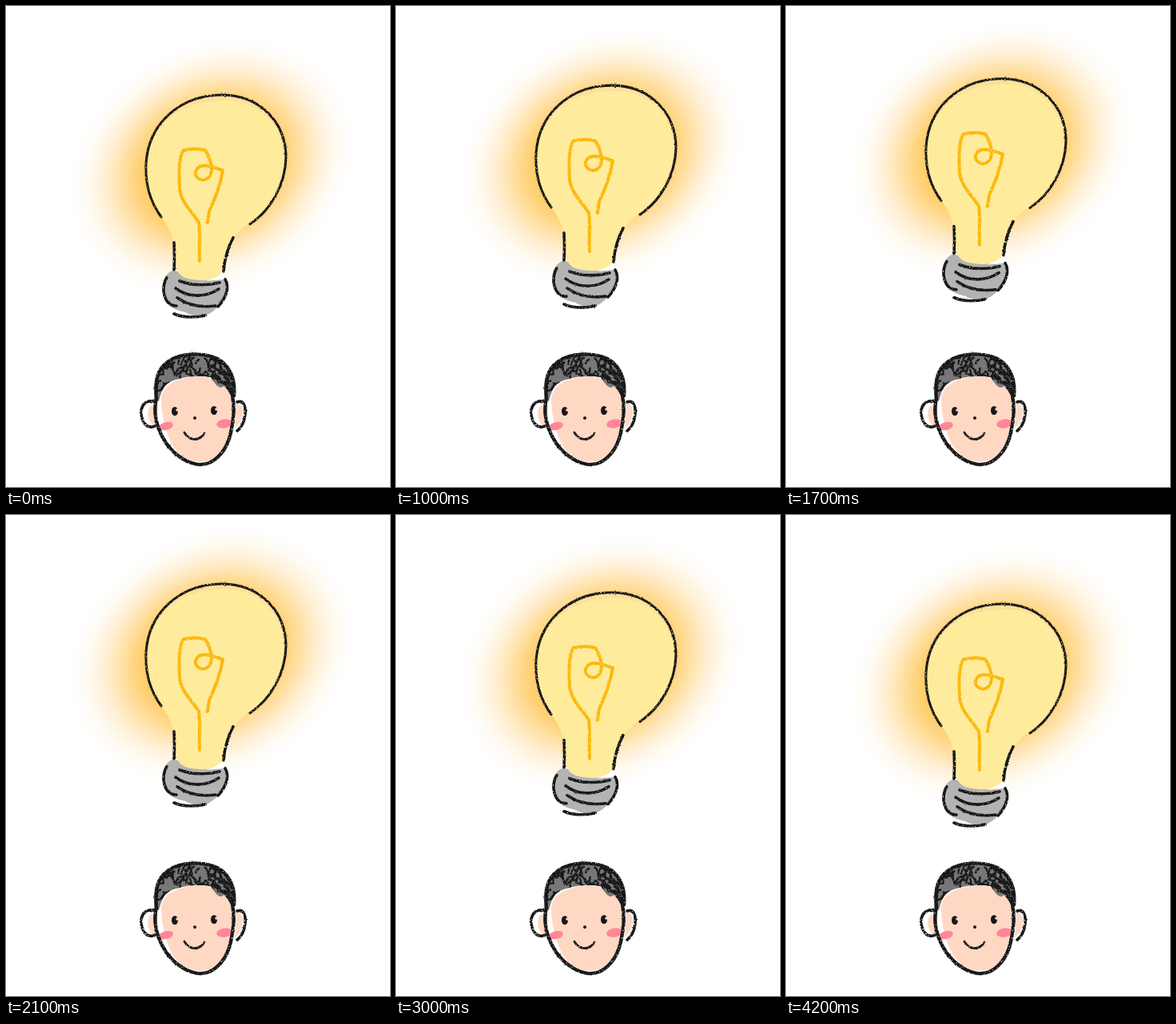
Animation of 480 by 600 pixels, one loop 4300 ms. Source, as an HTML page:

```html
<!DOCTYPE html>
<html lang="en">
<head>
<meta charset="utf-8">
<title>Bright idea</title>
<style>
  html, body { margin: 0; width: 100%; height: 100%; overflow: hidden; background: #fff; }
  svg { display: block; }
  .ink { fill: none; stroke: #171717; stroke-width: 3.6; stroke-linecap: round; stroke-linejoin: round; filter: url(#crayon); }
  .skin { fill: #ffd8c4; }
</style>
</head>
<body>
<svg width="480" height="600" viewBox="0 0 480 600">
  <defs>
    <radialGradient id="halo">
      <stop offset=".45" stop-color="#ffca60"/>
      <stop offset=".55" stop-color="#ffd582"/>
      <stop offset=".66" stop-color="#ffe4b0"/>
      <stop offset=".77" stop-color="#fff1d9"/>
      <stop offset=".89" stop-color="#fffbf4"/>
      <stop offset="1" stop-color="#fff"/>
    </radialGradient>
    <filter id="crayon" filterUnits="userSpaceOnUse" x="150" y="90" width="220" height="500" color-interpolation-filters="sRGB">
      <feTurbulence type="fractalNoise" baseFrequency=".3" numOctaves="2" seed="4" result="wobble"/>
      <feDisplacementMap in="SourceGraphic" in2="wobble" scale="2" xChannelSelector="R" yChannelSelector="G" result="rough"/>
      <feTurbulence type="fractalNoise" baseFrequency=".55" numOctaves="2" seed="9"/>
      <feColorMatrix values="0 0 0 0 0  0 0 0 0 0  0 0 0 0 0  5 0 0 0 -.95" result="grain"/>
      <feComposite in="rough" in2="grain" operator="in"/>
    </filter>
    <path id="hairShape" d="M187 492C185 470 187 455 201 444C217 432 247 431 264 440C280 448 288 467 284 491C280 485 278 478 272 474C266 480 261 470 256 463C238 460 218 463 205 469C196 474 194 482 191 493Z"/>
    <clipPath id="hairClip"><use href="#hairShape"/></clipPath>
  </defs>

  <g id="bulb">
    <ellipse rx="185" ry="150" transform="translate(257 200) rotate(-30)" fill="url(#halo)"/>
    <path fill="#fde09a" d="M194 262C181 244 174 221 175 197C178 146 218 111 270 111C318 111 351 146 350 190C349 226 329 257 305 272L250 200Z"/>
    <path fill="#b3b3b3" d="M208 330C197 335 193 347 197 362C200 374 210 379 224 382Q236 389 250 386C264 380 274 367 277 348L274 340Z"/>
    <path fill="#ffeb9c" d="M268 118C316 115 346 149 347 188C348 223 328 253 304 271C288 281 279 294 275 311L272 329C267 341 255 343 241 342C227 341 217 339 213 327C212 306 211 288 199 270C184 249 175 228 175 205C176 151 215 120 268 118Z"/>
    <path fill="#fff" d="M272 331L274 341L250 343Q265 339 272 331Z"/>
    <g class="ink">
      <path stroke-width="3.1" d="M194 263C180 244 174 221 175 197C178 146 218 111 270 111C318 111 350 146 350 189C349 222 332 254 305 272"/>
      <path d="M210 295Q211 312 210 329M284 289Q274 307 272 331"/>
      <path d="M201 339C193 350 197 375 213 374M274 341C280 351 275 364 265 375M210 384C222 389 238 389 249 386"/>
      <path d="M217 343C232 349 252 349 267 345M212 352C226 363 248 365 266 353M214 364C228 374 246 376 262 374"/>
    </g>
    <path class="ink" style="stroke:#fbb80a;stroke-width:4" d="M242 318C241 301 243 285 241 270C232 256 218 244 217 227C216 212 215 189 222 180C231 178 242 178 249 180C256 190 261 208 252 215C244 221 233 212 238 204C245 195 259 201 271 205C267 228 260 242 254 256L252 270"/>
  </g>

  <path class="skin" d="M180 499C174 508 178 522 188 525L190 497ZM288 496Q297 497 296 508T286 527Z"/>
  <path class="skin" d="M194 489C197 472 214 464 239 462C264 462 281 474 283 493C286 520 280 548 262 563C247 572 228 570 214 556C201 541 194 512 194 489Z"/>
  <g fill="#ff8699">
    <ellipse cx="200" cy="524" rx="9" ry="5" transform="rotate(-14 200 524)"/>
    <ellipse cx="273" cy="521" rx="10" ry="5.5" transform="rotate(-8 273 521)"/>
  </g>
  <use href="#hairShape" fill="#777"/>
  <g clip-path="url(#hairClip)"><path id="strands" class="ink" style="stroke-width:2.4"/></g>
  <g class="ink" style="stroke-width:4.4">
    <path d="M188 491C186 469 188 454 202 444C218 432 247 432 264 440C279 448 287 464 285 486"/>
    <path d="M188 489C184 507 188 527 200 545C212 562 229 572 244 572C263 571 277 552 281 532C285 515 286 501 283 486"/>
    <path stroke-width="3.6" d="M185 493C173 491 168 500 169 510C171 521 177 528 186 524M289 494C297 491 300 500 299 509C298 519 294 526 289 530"/>
    <path stroke-width="2.8" d="M223 532C229 543 242 543 248 533"/>
  </g>
  <g fill="#171717">
    <ellipse cx="211" cy="505.5" rx="4" ry="5.5"/>
    <ellipse cx="260" cy="504.5" rx="4" ry="5.5"/>
    <circle cx="236" cy="514" r="2"/>
  </g>
  <g class="skin">
    <circle cx="214" cy="504" r="1.8"/>
    <circle cx="263" cy="503" r="1.8"/>
  </g>
</svg>
<script>
const STEP = 100, STEPS = 43, RISE = 25;
const bulb = document.getElementById('bulb');

// Short crayon strands slanting across the hair
let seed = 7;
const random = () => (seed = seed * 16807 % 2147483647) / 2147483647;
let strands = '';
for (let i = 0; i < 150; i++) {
  const x = 184 + 100 * random(), y = 432 + 56 * random();
  const lean = (x - 226) / 8 + 16 * random() - 8, drop = 4 + 7 * random();
  strands += `M${x} ${y}q${lean} 1 ${lean * 1.4} ${drop}`;
}
document.getElementById('strands').setAttribute('d', strands);

function draw(now) {
  const step = Math.floor(now / STEP) % STEPS;
  const half = (STEPS - 1) / 2;
  const lift = RISE * (1 - Math.abs(step - half) / half);
  bulb.setAttribute('transform', `translate(0 ${-lift})`);
  requestAnimationFrame(draw);
}
draw(performance.now());
</script>
</body>
</html>
```
